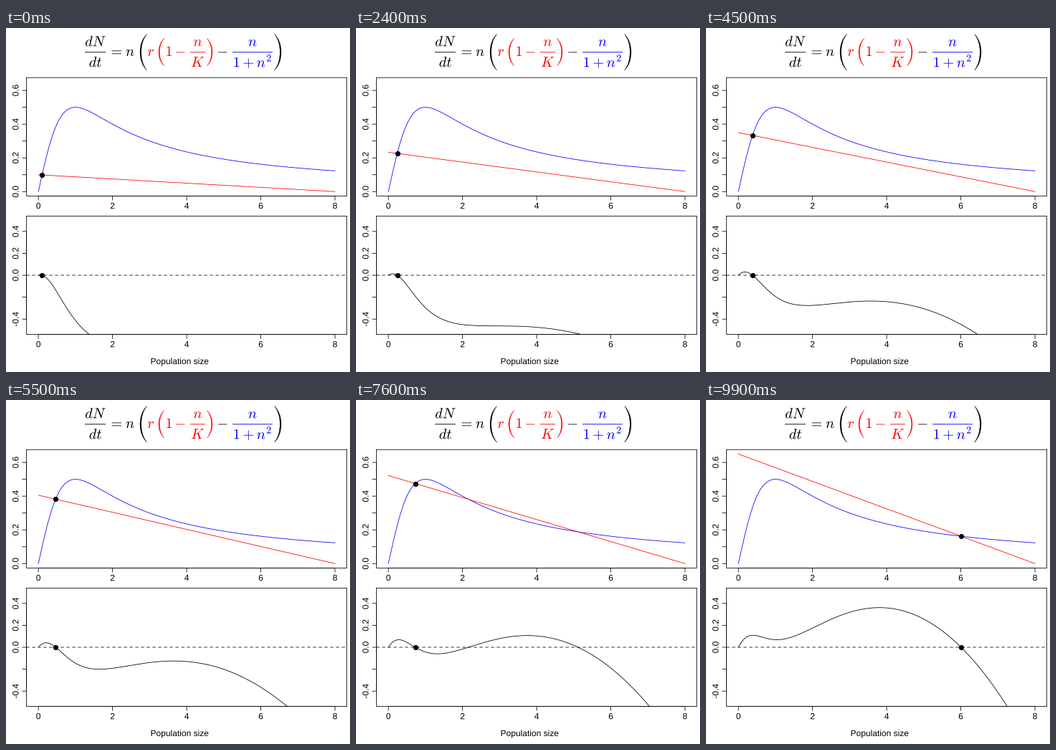
Recreate the animation shown at these times as a matplotlib script. Size 480 by 480 pixels, loop 10000 ms.

```python
import numpy as np
import matplotlib.pyplot as plt
from matplotlib.animation import FuncAnimation
from matplotlib.patches import PathPatch
from matplotlib.path import Path
from matplotlib.textpath import TextPath
from matplotlib.transforms import Affine2D

SIZE, DPI = 480, 96
PX = 72 / DPI              # one pixel in points
THIN = 0.8 * PX            # stroke of frames and curves
FRAMES, INTERVAL = 100, 100
K = 8
R_MIN, R_MAX = 0.1, 0.65
LEFT, RIGHT = 28.6, 475.6  # panel edges in pixels
HEIGHT = 165.2
TICK = 5.8

plt.rcParams.update({"font.family": "Liberation Sans", "mathtext.fontset": "cm"})

fig = plt.figure(figsize=(SIZE / DPI, SIZE / DPI), dpi=DPI, facecolor="white")

# Pixel-unit layer for the formula, frames and labels, y pointing up
page = fig.add_axes([0, 0, 1, 1])
page.set(xlim=(0, SIZE), ylim=(0, SIZE))
page.axis("off")


def stroke(xs, ys, color="black", width=THIN, cap="round"):
    """Line in pixels from the top left, kept off the pixel grid."""
    page.plot(xs, SIZE - np.array(ys), color=color, lw=width,
              solid_capstyle=cap, snap=False)


def write(text, cx, baseline, color="black", size=12, angle=0):
    """Place text with its ink centred on cx, or on the baseline if turned."""
    path = TextPath((0, 0), text, size=size)
    box = path.get_extents()
    if angle:
        move = Affine2D().translate(-(box.x0 + box.x1) / 2, 0).rotate_deg(angle)
    else:
        move = Affine2D().translate(-(box.x0 + box.x1) / 2, 0)
    move.translate(cx, SIZE - baseline)
    page.add_patch(PathPatch(move.transform_path(path), fc=color, lw=0))


def panel(top, ylim, yticks, labelled):
    bottom = top + HEIGHT
    ax = fig.add_axes([LEFT / SIZE, 1 - bottom / SIZE,
                       (RIGHT - LEFT) / SIZE, HEIGHT / SIZE])
    ax.set(xlim=(-0.04 * K, 1.04 * K), ylim=ylim)
    ax.axis("off")

    stroke([LEFT, RIGHT, RIGHT, LEFT, LEFT], [top, top, bottom, bottom, top])
    to_px = ax.transData.transform
    xs = [to_px((v, 0))[0] for v in range(0, K + 1, 2)]
    ys = [SIZE - to_px((0, v))[1] for v in yticks]
    stroke([xs[0], xs[-1]], [bottom, bottom])
    stroke([LEFT, LEFT], [ys[0], ys[-1]])
    for i, x in enumerate(xs):
        stroke([x, x], [bottom, bottom + TICK])
        write(str(2 * i), x, bottom + 17.7)
    for v, y in zip(yticks, ys):
        stroke([LEFT - TICK, LEFT], [y, y])
        if v in labelled:
            write(f"{v:.1f}", 17.4, y, angle=90)
    return ax


def math(tex, cx, baseline, color="black"):
    write(f"${tex}$", cx, baseline, color, size=20.3)


def bar(x0, x1, color="black"):
    stroke([x0, x1], [33.8, 33.8], color, 0.9 * PX, "butt")


def paren(back, tip, top, bottom, weight, color):
    """Parenthesis bulging towards x = back, ending at x = tip."""
    w, h = tip - back, bottom - top
    t = weight / abs(w)
    pts = np.array([
        (1, 0), (0.3, 0.13), (0, 0.3), (0, 0.5),
        (0, 0.7), (0.3, 0.87), (1, 1),
        (0.42, 0.85), (t, 0.7), (t, 0.5),
        (t, 0.3), (0.42, 0.15), (1, 0)])
    verts = np.column_stack([back + w * pts[:, 0], SIZE - top - h * pts[:, 1]])
    codes = [Path.MOVETO] + [Path.CURVE4] * 12
    page.add_patch(PathPatch(Path(verts, codes), fc=color, ec=color, lw=0.3 * PX))


def formula():
    upper, middle, lower = 25.4, 39, 54.3
    math("dN", 124.8, upper)
    bar(110, 139)
    math("dt", 124.8, lower)
    math("=", 154.3, middle)
    math("n", 173.1, middle)
    paren(187, 196.5, 8.5, 59, 1.8, "black")
    math("r", 202, middle, "red")
    paren(213, 220.8, 14.5, 53, 1.4, "red")
    math("1", 227.6, middle, "red")
    math("-", 243.3, middle, "red")
    math("n", 267.5, upper, "red")
    bar(257, 278, "red")
    math("K", 267.5, lower, "red")
    paren(288, 280.4, 14.5, 53, 1.4, "red")
    math("-", 302.3, middle)
    math("n", 344, upper, "blue")
    bar(316, 372, "blue")
    math("1+n^2", 344, lower, "blue")
    paren(384, 374.6, 8.5, 59, 1.8, "black")


def loss(n):
    return n / (1 + n ** 2)


def gain(n, r):
    return r * (1 - n / K)


def equilibrium(r):
    """Lowest positive population where gain equals loss."""
    roots = np.roots([-r / K, r, -(r / K + 1), r])
    return min(z.real for z in roots if abs(z.imag) < 1e-6 and z.real > 0)


formula()
write("Population size", 242.5, 469)

rates = panel(69.2, (-0.026, 0.676), np.arange(7) / 10, (0, 0.2, 0.4, 0.6))
growth = panel(262.4, (-0.54, 0.54), np.arange(-2, 3) / 5, (-0.4, 0, 0.2, 0.4))

n = np.linspace(0, K, 401)
rates.plot(n, loss(n), color="blue", lw=THIN)
gain_line, = rates.plot([], [], color="red", lw=THIN)
growth.axhline(0, color="black", lw=THIN, ls=(0, (5, 5)),
               dash_capstyle="round", snap=False)
growth_line, = growth.plot([], [], color="black", lw=THIN)
dot = dict(s=(7.2 * PX) ** 2, color="black", linewidths=0, zorder=5)
rate_dot = rates.scatter([0], [0], **dot)
growth_dot = growth.scatter([0], [0], **dot)


def update(i):
    r = R_MIN + (R_MAX - R_MIN) * i / (FRAMES - 1)
    eq = equilibrium(r)
    gain_line.set_data(n, gain(n, r))
    growth_line.set_data(n, n * (gain(n, r) - loss(n)))
    rate_dot.set_offsets([(eq, loss(eq))])
    growth_dot.set_offsets([(eq, 0)])
    return gain_line, growth_line, rate_dot, growth_dot


anim = FuncAnimation(fig, update, frames=FRAMES, interval=INTERVAL,
                     repeat=True, repeat_delay=0, blit=False)
plt.show()
```
